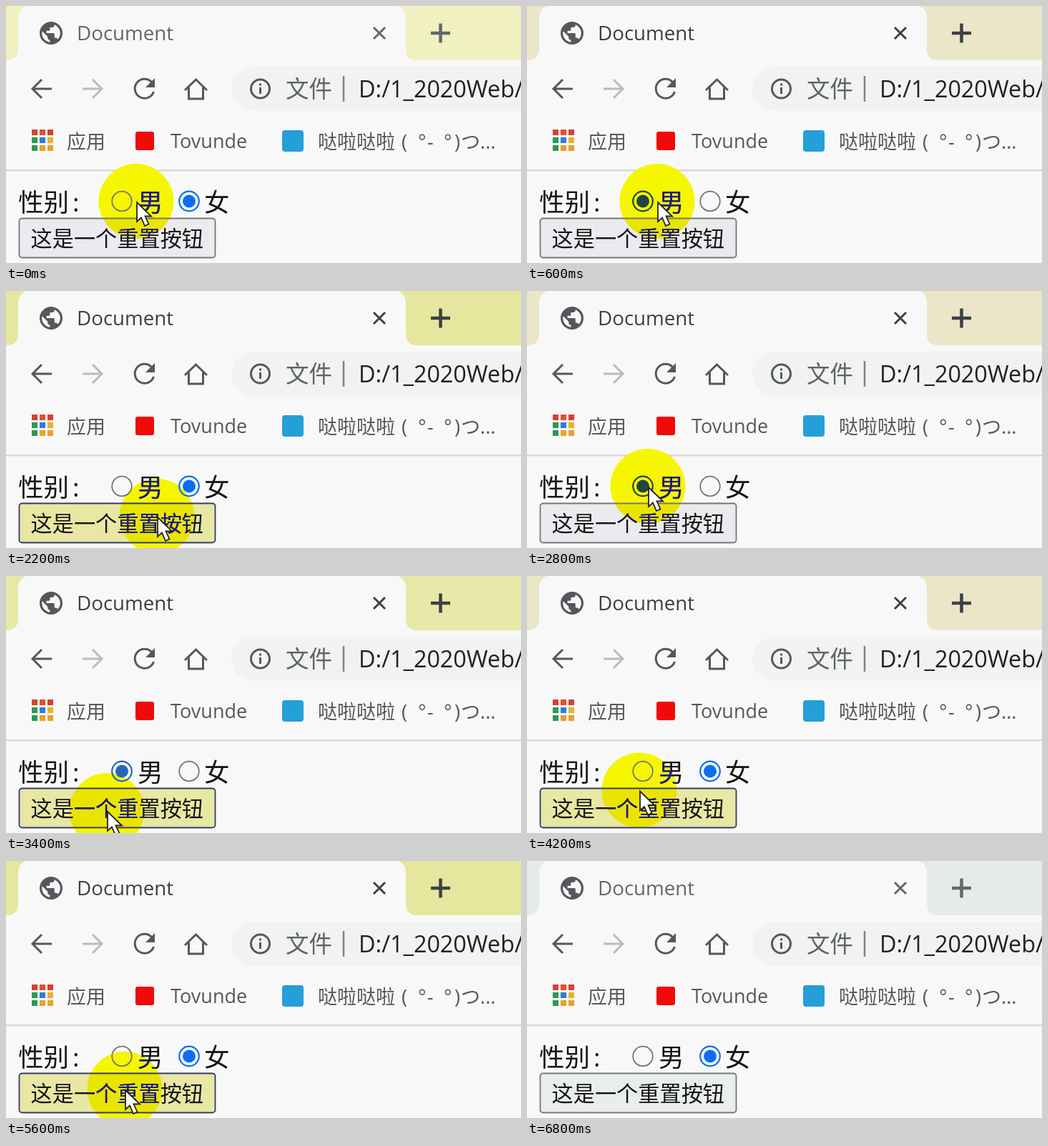
An HTML page for the animation above (7000 ms loop, 720 px wide and 360 px high).

```html
<!DOCTYPE html>
<html lang="zh-CN">
<head>
<meta charset="utf-8">
<title>Document</title>
<style>
  html, body { margin: 0; width: 100%; height: 100%; overflow: hidden; background: #f8f8f8; }
  svg { display: block; width: 720px; height: 360px; --ink: #5f6368; --strip: #f0f0c0; --button: #ececee; --edge: #767676; }
  text { font-family: "Open Sans", "Noto Sans CJK SC", "Noto Sans CJK", sans-serif; white-space: pre; }
  .ui { fill: #54585c; font-size: 27px; }
  .strip { fill: var(--strip); }
  .line { fill: none; stroke: #54585c; stroke-width: 3; }
  .tab { stroke: var(--ink); }
  .radio { fill: none; stroke: #767676; stroke-width: 1.8; }
  .radio.on { stroke: var(--dot); stroke-width: 2.2; }
  .dot { visibility: hidden; fill: var(--dot); }
  .on + .dot { visibility: visible; }
</style>
</head>
<body>
<svg viewBox="0 0 720 360">
  <defs>
    <clipPath id="spot"><circle class="halo" r="52.500"/></clipPath>
  </defs>
  <rect width="720" height="360" fill="#f8f8f8"/>

  <!-- tab strip -->
  <path class="strip" d="M0 0H28Q17 4 17 18V60Q17 76 0 76ZM720 0H548Q559 4 559 18V60Q559 76 575 76H720Z"/>
  <path fill="#54585c" transform="translate(43.800 18.800) scale(1.600)" d="M12 2a10 10 0 1 0 0 20a10 10 0 1 0 0-20zm-1 17.930c-3.950-.49-7-3.850-7-7.930 0-.62.08-1.210.21-1.790L9 15v1c0 1.100.9 2 2 2zm6.900-2.540c-.26-.81-1-1.390-1.900-1.390h-1v-3c0-.55-.45-1-1-1H8v-2h2c.55 0 1-.45 1-1V7h2c1.100 0 2-.9 2-2v-.41c2.930 1.190 5 4.060 5 7.410 0 2.080-.8 3.970-2.100 5.390z"/>
  <text class="ui" x="99" y="48" style="fill:var(--ink);font-size:27.700px">Document</text>
  <path class="line tab" d="M514 30l16 16m0-16l-16 16"/>
  <path class="line tab" style="stroke-width:4.500" d="M594 38h27M607.500 24.500v27"/>

  <!-- toolbar -->
  <path class="line" d="M64 116H37M50 103L37 116L50 129"/>
  <path class="line" style="stroke:#b9bbbd" d="M107 116H134M121 103L134 116L121 129"/>
  <path class="line" d="M204 107A13.500 13.500 0 1 0 206.500 120"/>
  <path fill="#54585c" d="M208 101V114H195Z"/>
  <path class="line" d="M250 118L265.500 103L281 118M255.500 114V130H275.500V114"/>
  <rect x="315" y="85" width="440" height="62" rx="31" fill="#f1f3f2"/>
  <circle class="line" cx="355.500" cy="116" r="13"/>
  <path class="line" d="M355.500 114V123M355.500 108.500V111.500"/>
  <text class="ui" x="391" y="128" style="font-size:32.500px;fill:#5f6368">文件</text>
  <path class="line" style="stroke:#808386;stroke-width:2.500" d="M472 98V134"/>
  <text x="493" y="128" font-size="32.300" fill="#202124">D:/1_2020Web/</text>

  <!-- bookmarks -->
  <g id="apps"></g>
  <text class="ui" x="85" y="200">应用</text>
  <rect x="181" y="176" width="26" height="26" rx="3" fill="#f00a0a"/>
  <text class="ui" x="230" y="199">Tovunde</text>
  <rect x="386" y="174" width="30" height="30" rx="4" fill="#259fd8"/>
  <text class="ui" y="200"><tspan x="436">哒啦哒啦</tspan><tspan x="553">(</tspan><tspan x="576">°</tspan><tspan x="589">-</tspan><tspan x="612">°</tspan><tspan x="627">)</tspan><tspan x="636">つ</tspan><tspan x="663">...</tspan></text>
  <rect y="229" width="720" height="2.500" fill="#d6dadb"/>

  <!-- page -->
  <circle class="halo" r="52.500" fill="#f6f600"/>
  <rect x="18.500" y="297.500" width="274" height="55" rx="4" fill="var(--button)"/>
  <rect x="18.500" y="297.500" width="274" height="55" rx="4" fill="#e9e500" clip-path="url(#spot)"/>
  <rect x="18.500" y="297.500" width="274" height="55" rx="4" fill="none" stroke="var(--edge)" stroke-width="1.800"/>
  <g style="--dot:var(--male)">
    <circle class="radio" id="male" cx="162" cy="273.500" r="13.800"/>
    <circle class="dot" cx="162" cy="273.500" r="9"/>
  </g>
  <g style="--dot:#0b6cf5">
    <circle class="radio" id="female" cx="256" cy="273.500" r="13.800"/>
    <circle class="dot" cx="256" cy="273.500" r="9"/>
  </g>
  <g fill="#151515">
    <g id="words">
      <text y="288" font-size="35.500"><tspan x="17">性别</tspan><tspan x="93">:</tspan><tspan x="184">男</tspan><tspan x="277">女</tspan></text>
      <text x="34.500" y="337" font-size="30.200">这是一个重置按钮</text>
    </g>
  </g>
  <use href="#words" fill="#1c1a86" clip-path="url(#spot)"/>
  <path id="cursor" d="M0 0V27L6 21.500L11 33L16.500 30.500L11.500 19.500H20Z" fill="#fff" stroke="#222" stroke-width="1.800"/>
</svg>
<script>
const LOOP = 7000, STEP = 200;
const $ = id => document.getElementById(id);
const svg = document.querySelector('svg');
const halos = document.querySelectorAll('.halo');

// time, x, y of the pointer tip
const path = [
  [0, 183, 275], [600, 183, 275], [1000, 183, 315], [1800, 183, 315],
  [2200, 212, 317], [2400, 212, 317], [2800, 170, 275], [3000, 170, 275],
  [3400, 142, 330], [4000, 142, 330], [4400, 174, 273], [5000, 174, 273],
  [5400, 167, 321], [5800, 167, 321], [6200, 260, 430], [7000, 260, 430]
];
// spans in which the first radio is chosen
const chosen = [[400, 1600], [2800, 4000], [4600, 5600]];
// time, tab strip colour
const strips = [
  [0, '#f0f0c0'], [400, '#ebe6c8'], [1000, '#e6e59b'], [2200, '#e6e69e'],
  [2600, '#ebe6c8'], [3200, '#e8e8a8'], [4200, '#ebe6c8'], [5200, '#e6e69e'], [6200, '#e5ece8']
];

const colors = ['#d9402f', '#e0502f', '#d9402f', '#2a9a55', '#2b7de0', '#eeb02a', '#2a9a55', '#eaa02f', '#eaa02f'];
$('apps').innerHTML = colors.map((c, i) =>
  `<rect x="${36 + i % 3 * 11}" y="${173 + Math.floor(i / 3) * 11}" width="8" height="8" fill="${c}"/>`).join('');

function pointer(t) {
  const i = path.findIndex(k => k[0] > t);
  const [t0, x0, y0] = path[i - 1], [t1, x1, y1] = path[i];
  const p = (t - t0) / (t1 - t0);
  return [x0 + (x1 - x0) * p, y0 + (y1 - y0) * p];
}

function draw(now) {
  const t = Math.floor(now % LOOP / STEP) * STEP;
  const [x, y] = pointer(t);
  const gone = t >= 6200;
  const hover = y > 298 && !gone;
  const male = chosen.some(([a, b]) => t >= a && t < b);
  const set = (name, value) => svg.style.setProperty('--' + name, value);

  $('cursor').setAttribute('transform', `translate(${x} ${y})`);
  for (const h of halos) {
    h.setAttribute('cx', x - 1);
    h.setAttribute('cy', y - 1.5);
  }
  $('male').classList.toggle('on', male);
  $('female').classList.toggle('on', !male);

  set('strip', strips.filter(s => s[0] <= t).pop()[1]);
  set('button', hover ? '#e8e7a4' : gone ? '#e9eeec' : '#ebeaee');
  set('edge', hover ? '#343a68' : '#767676');
  set('ink', t < 400 || gone ? '#63676b' : '#3c4044');
  set('male', t >= 3200 && t < 4000 ? '#2468b8' : '#234444');
}

function tick() {
  draw(performance.now());
  requestAnimationFrame(tick);
}
tick();
</script>
</body>
</html>
```
